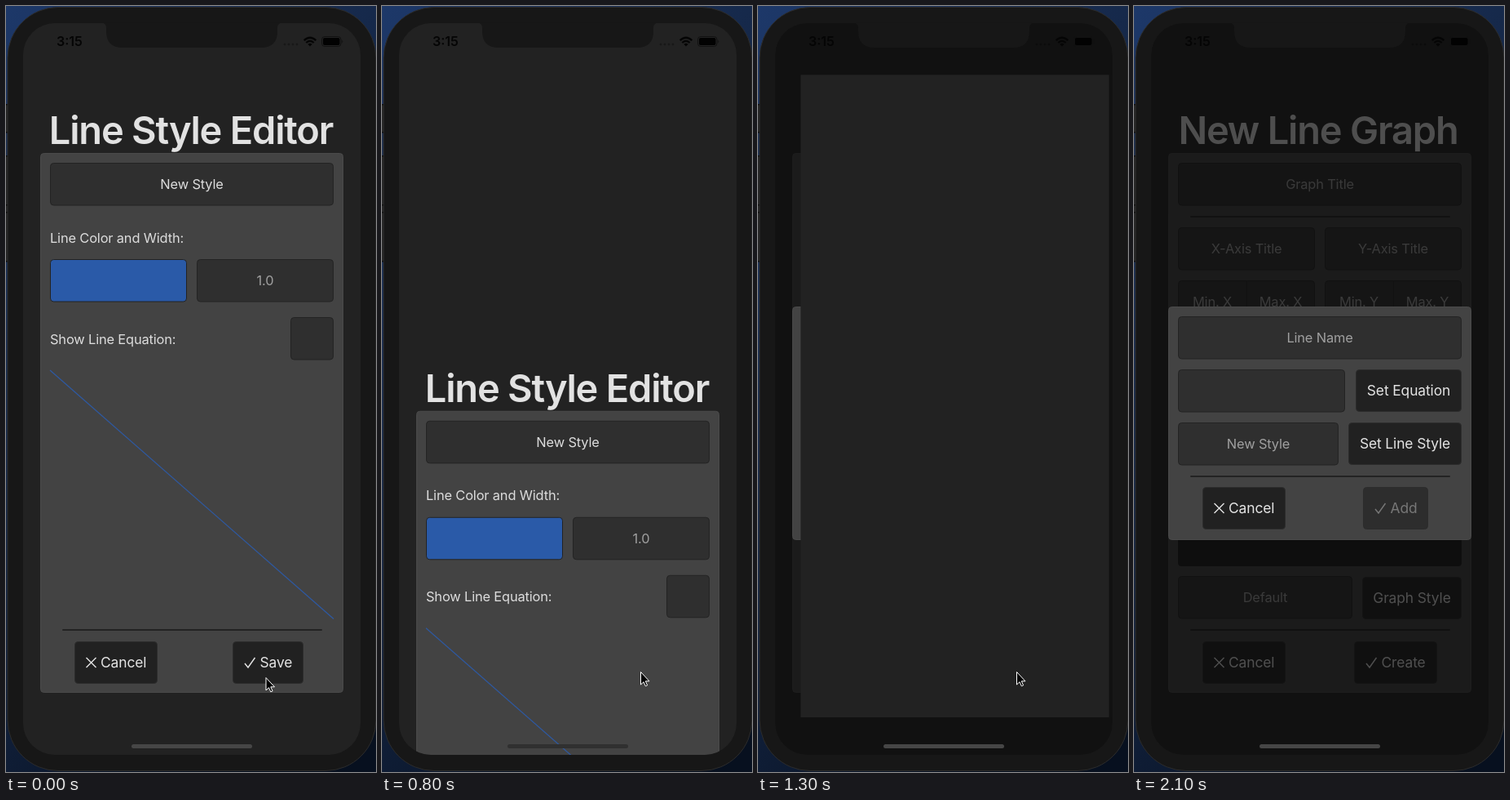
Animation, 454 px wide and 938 px high, one loop 2.3 s. Source, as an HTML page:

```html
<!DOCTYPE html>
<html>
<head>
<meta charset="utf-8">
<style>
  html, body { margin: 0; width: 100%; height: 100%; overflow: hidden; background: #0a1428; }
  svg { display: block; width: 454px; height: 938px; }
  text { font: 16.4px Inter, "Liberation Sans", sans-serif; font-optical-sizing: none; letter-spacing: -.15px; fill: #ddd; }
  .hint { fill: #a0a0a0; }
  .push { font-size: 17.4px; letter-spacing: -.1px; fill: #e4e4e4; }
  .title { font-size: 47px; font-weight: 600; letter-spacing: -1.2px; fill: #e2e2e2; }
  .clock { font-size: 16px; font-weight: 600; letter-spacing: 0; fill: #050505; }
  .mid { text-anchor: middle; }
  .icon { fill: none; stroke: #e4e4e4; stroke-width: 1.4; }
  .dim text { fill: #777; }
  .dim .icon { stroke: #777; }
  .off rect { fill: #2d2d2d; }
</style>
</head>
<body>
<svg id="stage" viewBox="0 0 454 938"></svg>
<script>
const box = (x, y, w, h, fill, stroke = 'none', r = 4) =>
  `<rect x="${x}" y="${y}" width="${w}" height="${h}" rx="${r}" fill="${fill}" stroke="${stroke}"/>`;
const label = (x, y, s, cls = '') => `<text x="${x}" y="${y}" class="${cls}">${s}</text>`;
const path = (d, attrs) => `<path d="${d}" ${attrs}/>`;
const title = (x, s) => label(x, 169, s, 'title mid');
const panel = (y, h) => box(42.5, y + .5, 371, h - 1, '#434343', '#4a4a4a');
const rule = y => box(69, y - 1, 319, 2, '#232323', 'none', 1);

function field(x, y, w, s = '', cls = 'hint', fill = '#2f2f2f') {
  return box(x + .5, y + .5, w - 1, 51.5, fill, '#232323') + label(x + w / 2, y + 32, s, cls + ' mid');
}
function button(x, y, w, s, icon) {
  const cy = y + 26;
  const mark = icon === 'x' ? `M${x + 14.5} ${cy - 6}l12 12m0-12l-12 12`
    : `M${x + 15} ${cy + 1}l4 5 8.5-12`;
  return box(x + .5, y + .5, w - 1, 51, '#212121', '#2c2c2c') + (icon
    ? path(mark, 'class="icon"') + label(x + (icon === 'x' ? 32 : 33.5), cy + 6.3, s, 'push')
    : label(x + w / 2, cy + 6.3, s, 'push mid'));
}
const pair = (x, a, b) => field(x, 336, 168) +
  box(x + 84, 336, 1, 52, '#232323', 'none', 0) +
  label(x + 42, 368, a, 'hint mid') + label(x + 126, 368, b, 'hint mid');

const editor = title(227, 'Line Style Editor') + panel(180, 661) +
  field(54, 192, 348, 'New Style', '') +
  label(54, 289.5, 'Line Color and Width:') +
  field(54, 310, 168, '', '', '#2a5aa8') + field(234, 310, 168, '1.0') +
  label(54, 413.5, 'Show Line Equation:') + field(349, 381, 53) +
  path('M54 446L402 750.5', 'stroke="#2d59a3" stroke-width="1.2"') +
  rule(764) + button(84, 778, 102, 'Cancel', 'x') +
  `<g id="save">${button(278, 778, 87, 'Save', 'check')}</g>`;

const graph = title(226, 'New Line Graph') + panel(180, 661) +
  field(54, 192, 348, 'Graph Title') + rule(258) +
  field(54, 271, 168, 'X-Axis Title') + field(234, 271, 168, 'Y-Axis Title') +
  pair(54, 'Min. X', 'Max. X') + pair(234, 'Min. Y', 'Max. Y') +
  box(54, 401, 348, 285, '#1a1a1a') +
  field(54, 698, 214, 'Default') + button(280, 699, 122, 'Graph Style') +
  rule(764) + button(84, 778, 102, 'Cancel', 'x') + button(270, 778, 102, 'Create', 'check');

const modal = panel(368, 286) + field(54, 380, 348, 'Line Name') +
  field(54, 445, 205) + button(272, 445, 130, 'Set Equation') +
  field(54, 510, 197, 'New Style') + button(263, 510, 139, 'Set Line Style') +
  rule(576) + button(84, 589, 102, 'Cancel', 'x') +
  `<g class="dim off">${button(281, 589, 80, 'Add', 'check')}</g>`;

const backdrop = box(0, 0, 454, 938, 'url(#sky)', 'none', 0) +
  box(0, 120, 4, 193, '#242424', 'none', 0) + box(0, 155, 4, 28, '#1c2f50', 'none', 0) +
  [120, 154, 183, 243, 252, 312].map(y => box(0, y, 4, 1.5, '#080808', 'none', 0)).join('');

const notch = path('M117 20.5Q123 21 123 27V31Q123 51 143 51H313Q333 51 333 31V27Q333 21 339 20.5Z', 'fill="#171717"');
const status = label(62, 49, '3:15', 'clock') +
  [342, 347, 352, 357].map(x => `<circle cx="${x}" cy="47" r="1.4" fill="#000" opacity=".3"/>`).join('') +
  path('M365.7 42.2Q373 35.4 380.3 42.2M368.3 45Q373 40.8 377.7 45', 'fill="none" stroke="#050505" stroke-width="2.3"') +
  path('M370.3 46.8Q373 44.6 375.7 46.8L373 49.5Z', 'fill="#050505"') +
  box(387.5, 37.5, 23.5, 12, 'none', '#111', 3.5) + box(389, 39, 20.5, 9, '#020202', 'none', 2) +
  path('M412.3 41.5q2 2 0 4z', 'fill="#111"');

const stage = document.getElementById('stage');
stage.innerHTML = `<defs>
  <linearGradient id="sky" x2=".6" y2="1">
    <stop stop-color="#1d3869"/><stop offset=".5" stop-color="#152747"/><stop offset="1" stop-color="#07101f"/>
  </linearGradient>
  <clipPath id="glass">${box(21, 21, 414, 896, '#000', 'none', 39)}</clipPath></defs>` +
  backdrop + box(2, 1.5, 452, 935, '#171717', '#2c2c2c', 62) +
  `<g clip-path="url(#glass)">${box(21, 21, 414, 896, '#222', 'none', 0)}
    <g id="editor">${editor}</g>
    <g id="main"><g opacity=".65">${graph}</g>
      <rect x="21" y="21" width="414" height="896" opacity=".5"/>${modal}
      <rect id="sheet" fill="#222"/></g>
    ${status}<g id="home">${box(154, 904, 148, 5, 'inherit', 'none', 2.5)}</g></g>` + notch +
  path('M.5 .5V16L4 12.7 6.3 17.8 8.6 16.8 6.3 11.8H11Z', 'id="cursor" fill="#000" stroke="#fff" stroke-linejoin="round"');

const [editorEl, saveEl, mainEl, sheetEl, homeEl, cursorEl] =
  ['editor', 'save', 'main', 'sheet', 'home', 'cursor'].map(id => document.getElementById(id));
const show = (el, on) => el.style.display = on ? '' : 'none';
const clamp = x => Math.min(1, Math.max(0, x));
const ease = x => (1 - Math.cos(Math.PI * clamp(x))) / 2;
const mix = (a, b, p) => a + (b - a) * p;

function draw(t) {
  const drop = t > 700 ? 896 * ease((t - 686.7) / 280) : 0;
  editorEl.setAttribute('transform', `translate(0 ${drop})`);
  show(editorEl, t < 1000);
  saveEl.setAttribute('class', t < 700 ? '' : 'dim');

  // The home bar darkens while the light panel passes behind it.
  const covered = drop + 180 < 904 && drop + 841 > 909;
  homeEl.setAttribute('fill', covered ? '#303030' : '#464646');

  // The sheet shrinks into the "Set Line Style" button, then fades.
  show(mainEl, t >= 1300);
  const p = ease((t - 1240) / 256);
  const left = mix(21, 263, p), top = mix(21, 510, p);
  const sheet = { x: left, y: top, width: mix(435, 402, p) - left, height: mix(917, 562, p) - top,
    rx: 4 * p, opacity: 1 - clamp((t - 1500) / 300) };
  for (const k in sheet) sheetEl.setAttribute(k, sheet[k]);

  const [x, y] = t < 100 ? [318.5, 822] : t < 2000 ? [317, 815] : [319.5, 811];
  cursorEl.setAttribute('transform', `translate(${x} ${y})`);
  show(cursorEl, t < 2100);
}

// The screen updates ten times a second.
const start = performance.now();
function frame() {
  draw(Math.floor((performance.now() - start) % 2300 / 100) * 100);
  requestAnimationFrame(frame);
}
frame();
</script>
</body>
</html>
```
